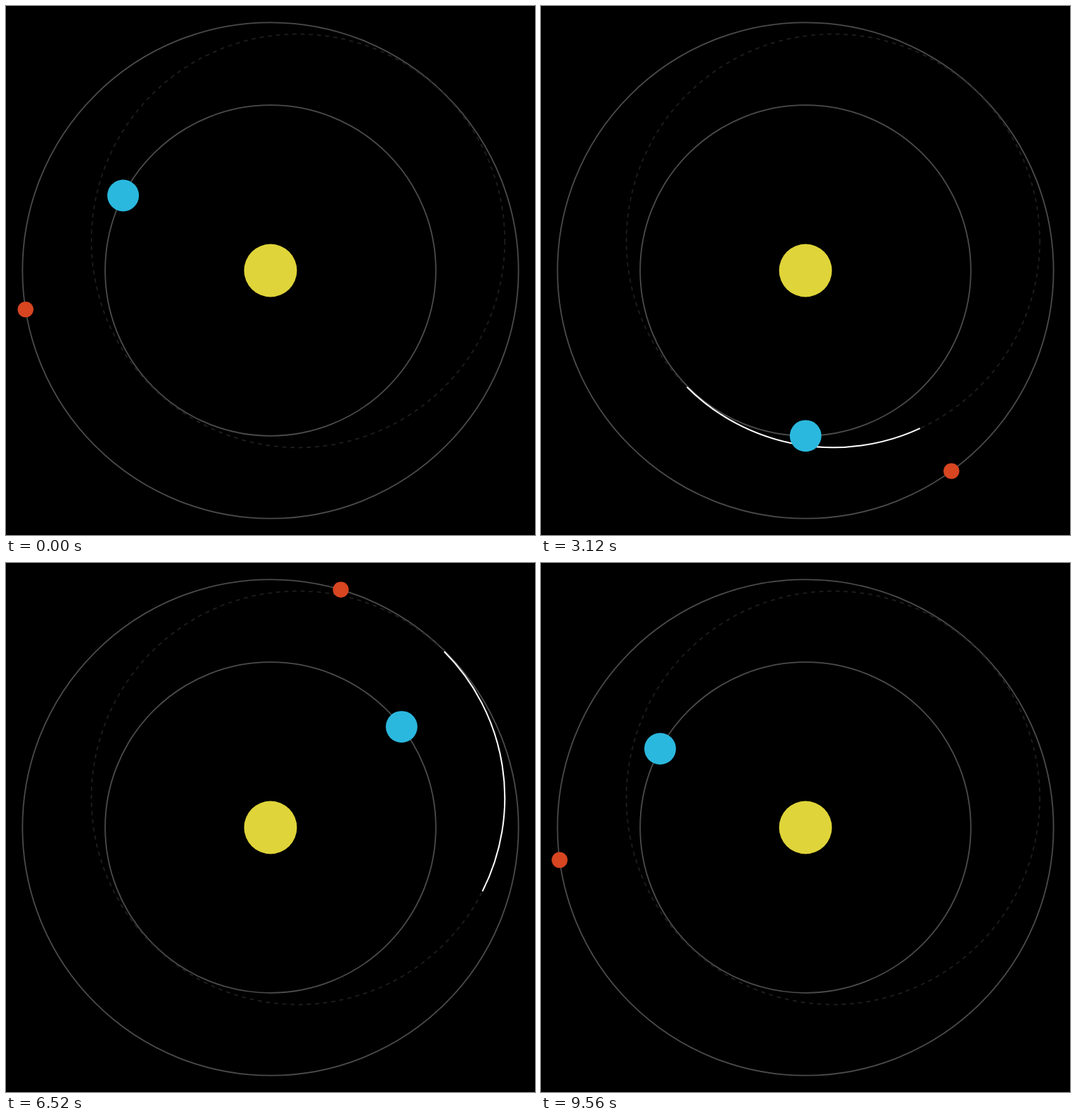
Recreate the animation shown at these times as an HTML page. Size 748x748 px, loop 9.6 s.

```html
<!DOCTYPE html>
<html lang="en">
<head>
<meta charset="utf-8">
<title>Transfer orbit</title>
<style>
  html, body { margin: 0; width: 100%; height: 100%; overflow: hidden; background: #000; }
  svg { display: block; width: 100%; height: 100%; }
</style>
</head>
<body>
<svg viewBox="0 0 748 748" fill="none">
  <g stroke="#4b4b4b" stroke-width="1.8">
    <circle cx="374" cy="374" r="233.8"/>
    <circle cx="374" cy="374" r="350.7"/>
  </g>
  <circle cx="413" cy="332" r="292.3" stroke="#1e1e1e" stroke-width="1.8" stroke-dasharray="5.8"/>
  <path id="trail" stroke="#fff" stroke-width="2"/>
  <circle cx="374" cy="374" r="37.4" fill="#dfd439"/>
  <circle id="inner" r="22.4" fill="#2bb8de"/>
  <circle id="outer" r="11.2" fill="#d74521"/>
</svg>
<script>
  const LOOP = 9600;
  const SUN = [374, 374], TRANSFER = [413, 332];
  const [trail, inner, outer] = ['trail', 'inner', 'outer'].map(id => document.getElementById(id));

  const clamp = x => Math.min(1, Math.max(0, x));

  // Angles run counterclockwise from the right, in degrees.
  function polar([cx, cy], r, deg) {
    const a = deg * Math.PI / 180;
    return [cx + r * Math.cos(a), cy - r * Math.sin(a)];
  }

  function place(el, r, deg) {
    const [x, y] = polar(SUN, r, deg);
    el.setAttribute('cx', x);
    el.setAttribute('cy', y);
  }

  // The head leaves fast and slows down; the tail follows, speeding up.
  function headAt(t) {
    const x = clamp((t - 1920) / 3840);
    return x * (1.477 + x * (-0.878 + x * 0.401));
  }
  const tailAt = t => clamp((t - 3120) / 4655) ** 1.6246;

  function arc(from, to) {
    if (to - from < 1e-4) return '';
    const r = 292.3;
    const a = polar(TRANSFER, r, 225 + 180 * from);
    const b = polar(TRANSFER, r, 225 + 180 * to);
    return `M${a} A${r} ${r} 0 0 0 ${b}`;
  }

  function draw(t) {
    const turn = 360 * t / LOOP;
    place(inner, 233.8, 153 + turn);
    place(outer, 350.7, 189 + turn);
    trail.setAttribute('d', arc(tailAt(t), headAt(t)));
  }

  function tick() {
    draw(performance.now() % LOOP);
    requestAnimationFrame(tick);
  }
  tick();
</script>
</body>
</html>
```
